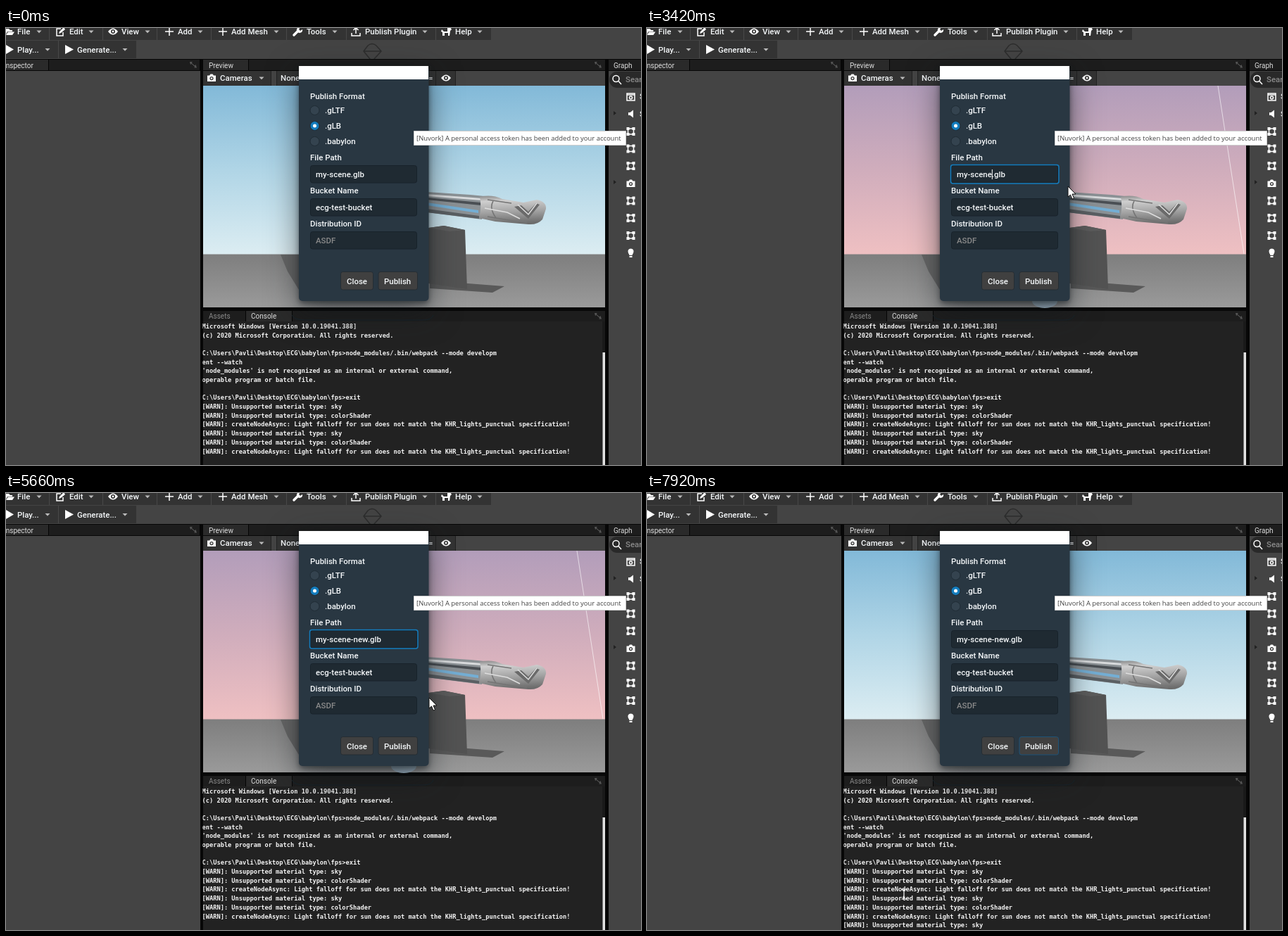
An HTML page that plays this animation: 902 by 621 pixels, repeating every 7.99 s.

```html
<!DOCTYPE html>
<html lang="en">
<head>
<meta charset="utf-8">
<title>Scene publishing</title>
<style>
html, body { margin: 0; width: 100%; height: 100%; overflow: hidden; background: #444; }
svg { display: block; width: 902px; height: 621px; }
text { font: 500 11.45px Roboto, sans-serif; fill: #f5f8fa; white-space: pre; }
.tab { font-size: 10px; font-weight: 400; fill: #ddd; }
.dim { fill: #8a8a8a; }
#log text { font: bold 8.7px "DejaVu Sans Mono", monospace; fill: #f4f4f4; }
.tip { font: 9.45px "Open Sans", sans-serif; fill: #444; }
.bar { fill: #333; }
.line { fill: none; stroke: #fff; stroke-width: 1.5; }
.shadow { filter: drop-shadow(0 4px 4px #10161a88) drop-shadow(0 12px 22px #10161a88); }
.field { fill: #1f2a32; stroke: #18222a; }
</style>
</head>
<body>
<svg viewBox="0 0 902 621">
  <defs>
    <linearGradient id="day" x2="0" y2="1"><stop stop-color="#82b9d8"/><stop offset=".5" stop-color="#b0d5e6"/><stop offset="1" stop-color="#dcedf2"/></linearGradient>
    <linearGradient id="dusk" x2="0" y2="1"><stop stop-color="#b29dba"/><stop offset=".5" stop-color="#d0adbc"/><stop offset="1" stop-color="#efc0c2"/></linearGradient>
    <linearGradient id="floor" x2="0" y2="1"><stop stop-color="#7e7e7e"/><stop offset="1" stop-color="#9a9a9a"/></linearGradient>
    <linearGradient id="chrome" x2=".1" y2="1"><stop stop-color="#8a8a8a"/><stop offset=".2" stop-color="#cfcfcf"/><stop offset=".6" stop-color="#a2a2a2"/><stop offset="1" stop-color="#6c6c6c"/></linearGradient>
    <clipPath id="view"><path d="M280 82H851V397H280Z"/></clipPath>
    <clipPath id="term"><path d="M279.500 417H847V621H279.500Z"/></clipPath>
    <path id="plus" class="line" d="M-6 0H6M0-6V6"/>
    <path id="chevron" d="M-3.500-1.500h7L0 2.200Z" fill="#bbb"/>
    <g id="eye"><path d="M-7 0Q0-9 7 0Q0 9-7 0Z" fill="#fff"/><circle r="3" fill="#333"/><circle r="1.400" fill="#fff"/></g>
    <g id="camera"><path d="M-6-3.500h3l1.500-2h3l1.500 2h3v8.500h-12Z" fill="#fff"/><circle cy=".6" r="2.600" fill="#333"/><circle cy=".6" r="1.300" fill="#fff"/></g>
    <g id="node"><path class="line" d="M-4-4H4V4H-4Z"/><path d="M-6-6h4v4h-4ZM2-6h4v4H2ZM-6 2h4v4h-4ZM2 2h4v4H2Z" fill="#fff"/></g>
    <path id="expand" d="M-5-4h4l-1.400 1.400L2 1.500 3.500 0 5 4.500H1L2.300 3.200-2.500-1.200-4 0Z" fill="#555"/>
  </defs>

  <path fill="#444" d="M0 0H902V621H0Z"/>
  <path class="bar" d="M0 0H689V17H0ZM0 18H185V43H0Z"/>
  <path stroke="#484848" d="M61.500 0V17M137.500 0V17M214.500 0V17M291.500 0V17M398.500 0V17M483.500 0V17M610.500 0V17M74.500 18V43"/>
  <path fill="none" stroke="#2d2d2d" stroke-width="1.500" d="M508 33L514 25Q520 20 526 25L533 33L523 44Q520 47 517 44ZM508 33H533"/>
  <g id="menu"></g>
  <path fill="#fff" d="M0 24L11 30.500 0 37ZM84 24L96 30.500 84 37ZM0 1H4L6 3H9V5H2L0 9ZM0 10L3 5.500H12L9 10Z"/>
  <path class="line" d="M78 1H72V11H81V6"/><path d="M75 8L76 5 82-1 84 2 78 7Z" fill="#fff"/>
  <use href="#eye" x="152" y="5"/><use href="#plus" x="232" y="5"/><use href="#plus" x="308" y="5"/>
  <path d="M409 10L415 4" stroke="#fff" stroke-width="3.500" stroke-linecap="round"/>
  <path d="M413 4Q412-1 418-1L416 2 418 4 421 2Q422 7 416 7Z" fill="#fff"/>
  <path class="line" d="M491 7V11H503V7M497 8V0M493.500 3L497-.5 500.500 3"/>
  <path d="M619 2L622 5H627V-1H631L633 2 631 4 630 11H628V7L623 7V11H620V6L618 5Z" fill="#fff"/>

  <path d="M0 44H277V61H0ZM276 44H280V621H276ZM280 44H856V61H280ZM851 44H856V621H851ZM856 44H902V61H856ZM276 397H856V402H276Z" fill="#070707"/>
  <path fill="#1d1d1d" d="M0 45H275V60H0ZM280 45H851V60H280ZM856 45H902V60H856ZM280 402H851V417H280Z"/>
  <path fill="#2a2a2a" d="M0 45H60V60H0ZM280 45H344V60H280ZM340 402H406V417H340Z"/>
  <path stroke="#050505" d="M60.500 44V60M344.500 44V60M340.500 402V417M406.500 402V417"/>
  <use href="#expand" x="266" y="52"/><use href="#expand" x="841" y="52"/><use href="#expand" x="841" y="409"/>
  <text class="tab" x="-3" y="56.500">Inspector</text><text class="tab" x="288" y="56.500">Preview</text>
  <text class="tab" x="863" y="56.500">Graph</text><text class="tab dim" x="288" y="413">Assets</text>
  <text class="tab" x="348" y="413">Console</text>

  <path class="bar" d="M280 61H376V82H280ZM385 61H638V82H385Z"/>
  <path stroke="#222" d="M376.500 61V82M384.500 61V82M610.500 61V82M638.500 61V82"/>
  <use href="#camera" x="292" y="71"/><use href="#eye" x="625" y="71"/><use href="#chevron" x="363" y="71"/>
  <text x="304" y="75">Cameras</text><text x="390" y="75">None</text><text x="600" y="75">=</text>

  <g id="graph">
    <rect x="857" y="62" width="60" height="23" rx="11" fill="#292929"/>
    <circle class="line" cx="866.500" cy="72" r="4.500"/><path class="line" d="M870 75.500L874 80"/>
    <text x="880" y="77" class="dim">Search</text>
    <path class="line" d="M882 93H893V103H882ZM882 95H893"/><circle class="line" cx="887.500" cy="99" r="2"/>
    <path fill="#fff" d="M884 120H886.500L891 116.500V127.500L886.500 124H884Z"/>
    <use href="#camera" x="887.500" y="221"/>
    <path fill="#fff" d="M885.500 323Q885 321 884 320Q882 314 887.500 313.500Q893 314 891 320Q890 321 889.500 323ZM885.500 324H889.500V326H885.500Z"/>
    <path fill="#222" d="M863 118L867 121 863 124ZM863 216L867 219 863 222Z"/>
    <text x="900" y="101">Scene</text><text x="900" y="126">Sounds</text>
  </g>

  <g clip-path="url(#view)">
    <rect id="sky" x="280" y="82" width="571" height="240"/>
    <path id="ray" d="M811 82L848 321" stroke="#fff" stroke-opacity=".6"/>
    <path d="M280 321.500H851V397H280Z" fill="url(#floor)"/>
    <path d="M390 322H416V372L400 346Z" fill="#666"/>
    <path d="M602 360L656 363 708 367 691 376 602 370Z" fill="#595959"/>
    <path d="M600 284L622 281 652 287 655 371 600 363Z" fill="#535353"/>
    <path d="M600 284L622 281 652 287 630 289Z" fill="#5c5c5c"/>
    <path d="M598 233L660 237 680 239 676 272 598 262Z" fill="#8b9195"/>
    <path d="M598 236L676 242V245L598 239Z" fill="#d8dadc"/>
    <path d="M598 241L674 248V252L598 244Z" fill="#4a4f54"/>
    <path d="M598 248L671 259V263L598 252Z" fill="#74aed4"/>
    <path d="M598 257L672 267V271L598 262Z" fill="#5a5f63"/>
    <path d="M673 240Q690 236 705 243L735 248 754 244Q768 247 767 257L762 272Q755 280 742 279L695 275 672 270Q676 254 673 240Z" fill="url(#chrome)"/>
    <path d="M722 254L742 271 758 251 753 249 742 261 732 252Z" fill="#6a6a6a"/>
    <path d="M684 244L718 249M684 268L720 274 740 276M692 246Q686 256 696 270" fill="none" stroke="#747474" stroke-width="1.500"/>
    <path d="M727 251L742 265 754 249M680 256L712 262 730 271" fill="none" stroke="#dedede" stroke-width="1.500"/>
  </g>

  <path d="M280 417H847V621H280Z" fill="#222"/><path d="M847 417H851V621H847Z" fill="#1a1a1a"/>
  <path d="M847.500 461H851V621H847.500Z" fill="#e2e2e2"/>
  <g id="log" clip-path="url(#term)"></g>

  <path d="M406 408Q409 415 425 415H592Q605 415 607 408" fill="none" stroke="#17232b"/>
  <ellipse id="glow" cx="565" cy="388" rx="18" ry="10" fill="#a9bfd0"/>
  <rect class="shadow" x="416" y="54" width="184.500" height="334" rx="5" fill="#293742"/>
  <path d="M416 54H600V73H416Z" fill="#fff"/>
  <g id="form"></g>
  <rect id="focus" x="431.500" y="194.500" width="153.500" height="26.500" rx="3" fill="none" stroke="#137cbd" stroke-width="1.500"/>
  <text id="file" x="440" y="212"></text>
  <path id="caret" d="M0 201V215" stroke="#fff"/>
  <rect x="475.500" y="346.500" width="46" height="25.500" rx="3" fill="#404040" stroke="#252d33"/>
  <rect id="publish" x="529" y="346.500" width="55.500" height="25.500" rx="3" fill="#404040"/>
  <text x="484" y="363.500">Close</text><text x="537" y="363.500">Publish</text>

  <path d="M579.500 146.500H880.500V166.500H579.500Z" fill="#fff" stroke="#ccc"/>
  <text class="tip" x="873.500" y="160" text-anchor="end">[Nuvork] A personal access token has been added to your account</text>

  <g id="cursor">
    <path id="beam" d="M-3.500-7Q0-7 0-5Q0-7 3.500-7M0-6V6M-3.500 7Q0 7 0 5Q0 7 3.500 7" fill="none" stroke="#fff" stroke-width="1.200"/>
    <path id="arrow" d="M0 0V15L3.500 12 6 18 8.500 17 6 11H11Z" fill="#fff" stroke="#111"/>
    <path id="hand" d="M-1.500 1Q0-1 1.500 1V6L7 7.500Q8 8 7.500 12L6 17H-1L-5 10Q-5 8-3 9L-1.500 11Z" fill="#fff" stroke="#111"/>
  </g>
</svg>
<script>
const $ = id => document.getElementById(id);
const add = (id, html) => $(id).insertAdjacentHTML('beforeend', html);
const label = (x, y, s, cls = '') => `<text x="${x}" y="${y}" class="${cls}">${s}</text>`;
const show = (id, on) => $(id).style.display = on ? '' : 'none';

// text, text x, baseline, chevron x
[['File', 16, 9, 47], ['Edit', 90, 9, 121], ['View', 164, 9, 201], ['Add', 244, 9, 276],
 ['Add Mesh', 320, 9, 384], ['Tools', 427, 9, 467], ['Publish Plugin', 510, 9, 595],
 ['Help', 638, 9, 673], ['Play...', 16, 34.5, 59], ['Generate...', 101, 34.5, 169]
].forEach(([s, x, y, c]) => add('menu', label(x, y, s) + `<use href="#chevron" x="${c}" y="${y - 4}"/>`));

[147, 171.5, 196, 245.5, 270, 295].forEach(y => add('graph', `<use href="#node" x="887.5" y="${y}"/>`));

add('form', label(432, 101, 'Publish Format'));
['.gLTF', '.gLB', '.babylon'].forEach((s, i) => {
  const y = 117 + 22 * i, on = i == 1;
  add('form', `<circle cx="438.5" cy="${y}" r="6.5" fill="${on ? '#137cbd' : '#34434f'}" stroke="#202c35"/>`
    + (on ? `<circle cx="438.5" cy="${y}" r="2.5" fill="#fff"/>` : '') + label(453, y + 4, s));
});
[['File Path', ''], ['Bucket Name', 'ecg-test-bucket'], ['Distribution ID', 'ASDF']].forEach(([s, v], i) => {
  const y = 188 + 47 * i;
  add('form', label(432, y, s)
    + `<rect class="field" x="432.5" y="${y + 7.5}" width="151" height="24.5" rx="3"/>`
    + label(440, y + 24, v, i == 2 ? 'dim' : ''));
});

const prompt = 'C:\\Users\\Pavli\\Desktop\\ECG\\babylon\\fps&gt;';
const sky = '[WARN]: Unsupported material type: sky';
const warnings = [sky, '[WARN]: Unsupported material type: colorShader',
  '[WARN]: createNodeAsync: Light falloff for sun does not match the KHR_lights_punctual specification!'];
['Microsoft Windows [Version 10.0.19041.388]', '(c) 2020 Microsoft Corporation. All rights reserved.', '',
 prompt + 'node_modules/.bin/webpack --mode developm', 'ent --watch',
 "'node_modules' is not recognized as an internal or external command,", 'operable program or batch file.', '',
 prompt + 'exit', ...warnings, ...warnings, sky
].forEach((s, i) => add('log', label(278.5, 427 + 12.68 * i, s)));
$('log').lastElementChild.id = 'newest';

// pointer runs: start, end, number of steps
const runs = [[0, 0, 1], [630, 1250, 9], [1490, 2250, 11], [2330, 2410, 2], [2560, 2640, 2],
  [2790, 3570, 11], [5660, 6350, 10], [7210, 7920, 10]];
// pointer path: time, x, y
const path = [[630, 540, 554], [860, 530, 395], [1250, 519, 238], [1490, 519, 213], [1800, 446, 184],
  [2250, 498, 249], [2410, 498, 271], [2640, 484, 222], [2790, 483, 217], [2950, 488, 211],
  [3100, 492, 212], [3492, 624, 228], [3570, 628, 234], [5660, 601, 291], [5967, 586, 394],
  [6350, 562, 362], [7210, 561, 368], [7370, 549, 396], [7920, 365, 570]];
// typed suffixes: time, text
const typed = [[0, ''], [4030, '-'], [4110, '-n'], [4510, '-'], [4660, '-n'], [4740, '-ne'], [4820, '-new']];
const latest = (list, t) => list.filter(k => k[0] <= t).pop();

function step(t) {
  const [start, end, n] = latest(runs, t);
  if (n < 2) return start;
  const d = (end - start) / (n - 1);
  return start + Math.min(Math.floor((t - start + 5) / d), n - 1) * d;
}

function pointer(t) {
  const i = path.findIndex(k => k[0] > t);
  if (i < 0) return path[path.length - 1].slice(1);
  const a = path[Math.max(i - 1, 0)], b = path[i];
  const p = Math.max(0, (t - a[0]) / (b[0] - a[0] || 1));
  return [a[1] + (b[1] - a[1]) * p, a[2] + (b[2] - a[2]) * p];
}

function draw(now) {
  const t = now % 7990, s = step(t), [x, y] = pointer(s);
  // the view refreshes when the pointer moves over it
  const dusk = s >= 3400 && s < 5730;
  $('sky').setAttribute('fill', dusk ? 'url(#dusk)' : 'url(#day)');
  show('glow', dusk);
  show('ray', s >= 860 && s < 5730);
  show('newest', t >= 7210);

  const focused = s >= 2940 && s < 6270;
  const name = 'my-scene' + latest(typed, t)[1];
  $('file').textContent = name + '.glb';
  show('focus', focused);
  show('caret', focused && t < 5430);
  $('caret').setAttribute('transform', `translate(${440.5 + $('file').getSubStringLength(0, name.length)})`);
  $('publish').setAttribute('stroke', s >= 6270 ? '#1d5378' : '#252d33');

  const inField = x > 432 && x < 584 && [195, 242, 289].some(top => y > top && y < top + 26);
  const beam = inField && y != 222 || y > 417;
  const hand = x > 529 && x < 585 && y > 346 && y < 373;
  show('cursor', t >= 630);
  show('beam', beam);
  show('hand', hand);
  show('arrow', !beam && !hand);
  $('cursor').setAttribute('transform', `translate(${Math.round(x)} ${Math.round(y)})`);
}

const begin = performance.now();
(function frame() {
  draw(performance.now() - begin);
  requestAnimationFrame(frame);
})();
</script>
</body>
</html>
```
